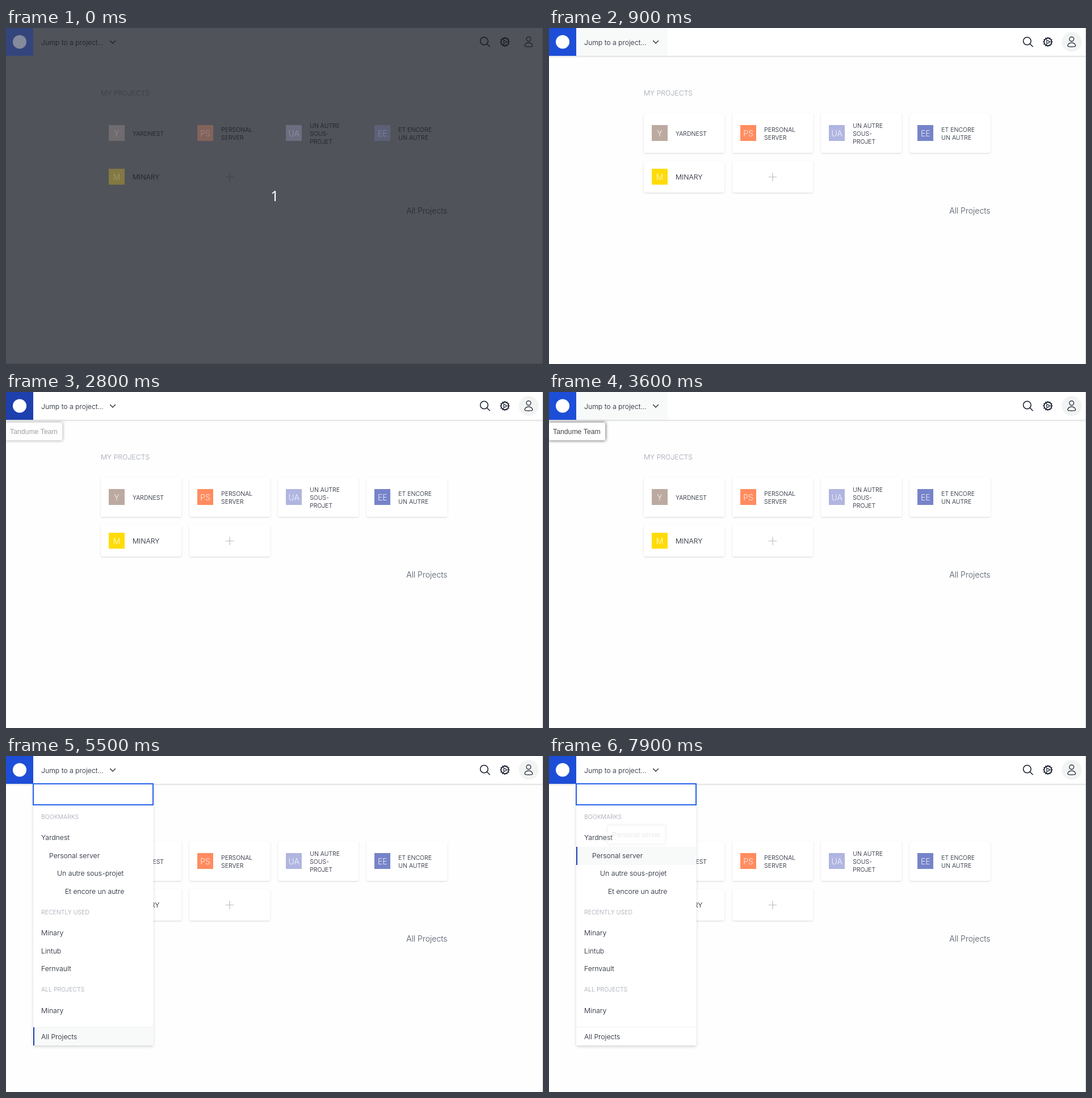
An HTML page with a canvas for the animation above (8 s loop, 946 by 592 pixels).

```html
<!DOCTYPE html>
<html lang="en">
<head>
<meta charset="utf-8">
<title>Project jump menu</title>
<style>
  html, body { margin: 0; width: 100%; height: 100%; overflow: hidden; background: #fff; }
  canvas { display: block; width: 946px; height: 592px; }
</style>
</head>
<body>
<canvas id="stage" width="946" height="592"></canvas>
<script>
const ctx = document.getElementById('stage').getContext('2d');
const W = 946, H = 592, LOOP = 8000, STEP = 100;
const INK = '#111827', MUTED = '#9ca3af', BLUE = '#1d4ed8', NAVY = '#1e40af';
const HOVER = '#f8faf9', VEIL = '#51535a';
const ROW = 31.5;

const cards = [
  { mark: 'Y', color: '#bcaaa0', lines: ['YARDNEST'] },
  { mark: 'PS', color: '#ff8c60', lines: ['PERSONAL', 'SERVER'] },
  { mark: 'UA', color: '#b0b5e1', lines: ['UN AUTRE', 'SOUS-', 'PROJET'] },
  { mark: 'EE', color: '#7783c9', lines: ['ET ENCORE', 'UN AUTRE'] },
  { mark: 'M', color: '#ffdb08', lines: ['MINARY'], size: 12.25 },
  { plus: true }
].map((card, i) => {
  const second = i > 3;
  return { ...card, x: 167 + (i % 4) * 156.1, y: second ? 234.5 : 150.5, h: second ? 56 : 70 };
});

const headings = [['BOOKMARKS', 107], ['RECENTLY USED', 275], ['ALL PROJECTS', 411.5]];
const items = [
  ['Yardnest', 144, 0], ['Personal server', 175.5, 1],
  ['Un autre sous-projet', 207, 2], ['Et encore un autre', 238.5, 3],
  ['Minary', 312, 0], ['Lintub', 343.5, 0], ['Fernvault', 375, 0],
  ['Minary', 448.5, 0], ['All Projects', 494.5, 0]
];

// [start time, value] pairs; the last one reached applies
const navHover = [[0, 0], [800, .5], [900, 1], [1300, .5], [1500, 0], [1800, 1], [2200, 0], [3600, 1], [4700, 0]];
const rowHover = [
  [0, -1], [5100, 2], [5200, 4], [5300, 6], [5400, 7], [5500, 8],
  [5800, 7], [5900, 6], [6000, 5], [6100, -1],
  [6300, 3], [6400, 2], [6600, 1], [6700, 0], [6900, -1], [7400, 0], [7500, 1]
];
const caret = [[0, 0], [4000, 1], [5200, 0], [6500, 1], [7700, 0]];

const at = (track, t) => track.filter(([start]) => start <= t).pop()[1];
const swing = x => .5 - Math.cos(Math.PI * Math.min(1, Math.max(0, x))) / 2;

function text(str, x, middle, size, color = INK, weight = 300, family = 'Inter', align = 'left') {
  ctx.font = `${weight} ${size}px ${family}, sans-serif`;
  ctx.textAlign = align;
  ctx.fillStyle = color;
  ctx.fillText(str, x, Math.round(middle + size * .36));
}

function rect(x, y, w, h, color) {
  ctx.fillStyle = color;
  ctx.fillRect(x, y, w, h);
}

// The shadow is clipped to the outside, so a translucent panel stays clean.
function panel(x, y, w, h, radius, blur, shadow, dy = 1) {
  const shape = new Path2D(), outside = new Path2D();
  shape.roundRect(x, y, w, h, radius);
  outside.rect(-50, -50, W + 100, H + 100);
  outside.addPath(shape);
  ctx.save();
  ctx.clip(outside, 'evenodd');
  ctx.shadowColor = shadow;
  ctx.shadowBlur = blur;
  ctx.shadowOffsetY = dy;
  ctx.fillStyle = '#fff';
  ctx.fill(shape);
  ctx.restore();
  ctx.fillStyle = '#fff';
  ctx.fill(shape);
}

function stroke(path, color = INK, width = 1.4) {
  ctx.strokeStyle = color;
  ctx.lineWidth = width;
  ctx.lineCap = ctx.lineJoin = 'round';
  ctx.stroke(new Path2D(path));
}

function disc(x, y, r, color) {
  ctx.fillStyle = color;
  ctx.beginPath();
  ctx.arc(x, y, r, 0, 2 * Math.PI);
  ctx.fill();
}

function ring(x, y, r, width = 1.4) {
  ctx.strokeStyle = INK;
  ctx.lineWidth = width;
  ctx.beginPath();
  ctx.arc(x, y, r, 0, 2 * Math.PI);
  ctx.stroke();
}

function drawGear(x, y) {
  ring(x, y, 6.6, 1.6);
  ring(x, y, 2.2, 1.1);
  for (let i = 0; i < 12; i++) {
    const a = i * Math.PI / 6, c = Math.cos(a), s = Math.sin(a);
    stroke(`M${x + 7 * c} ${y + 7 * s}L${x + 8 * c} ${y + 8 * s}`, INK, 1.5);
    if (i % 4 === 0) stroke(`M${x + 2.4 * c} ${y + 2.4 * s}L${x + 6.4 * c} ${y + 6.4 * s}`, INK, 1.2);
  }
}

function drawLogo(color, dot = '#fff') {
  rect(0, 0, 48, 49, color);
  disc(24, 24.5, 12, dot);
}

function drawHeader(hover, logoColor, dim) {
  if (!dim) panel(-5, -5, W + 10, 54, 0, 3, 'rgba(0,0,0,.2)');
  if (hover) {
    ctx.globalAlpha = hover;
    rect(48, 0, 161, 49, HOVER);
    ctx.globalAlpha = 1;
  }
  drawLogo(logoColor);
  text('Jump to a project...', 62, 25.5, 12.25);
  stroke('M183.5 22.5l4.5 4.5l4.5-4.5', INK, 1.1);
  ring(842.3, 23, 6.8, 1.5);
  stroke('M847.3 28l4.8 4.8', INK, 1.5);
  drawGear(878.8, 24.5);
  if (!dim) disc(920.7, 24.5, 17.5, '#f2f4f3');
  ring(920.7, 19.5, 3.9, 1.2);
  stroke('M913.8 31.5a6.9 5.6 0 0 1 13.8 0q0 1.6-6.9 1.6t-6.9-1.6z', INK, 1.2);
}

function drawMark({ mark, color, x, y, h }, alpha = 1) {
  const left = Math.round(x + 14), top = Math.round(y + h / 2 - 14.2);
  rect(left, top, 28, 28, VEIL);
  ctx.globalAlpha = alpha;
  rect(left, top, 28, 28, color);
  text(mark, x + 28, top + 14.5, 14, 'rgba(255,255,255,.85)', 300, 'Inter', 'center');
  ctx.globalAlpha = 1;
}

function drawCard(card, dim) {
  const { x, y, h, lines, size = 10.5 } = card;
  if (!dim) panel(x, y, 142.2, h - .5, 3.5, 3, 'rgba(0,0,0,.16)');
  const middle = y + h / 2 + .5;
  if (card.plus) {
    stroke('M387 262.5h14M394 255.5v14', '#b9bec6', 1.2);
    return;
  }
  drawMark(card);
  lines.forEach((line, i) => text(line, x + 56, middle + (i - (lines.length - 1) / 2) * 14, size));
}

function drawPage(hover, logoColor, dim) {
  rect(0, 0, W, H, '#fefefe');
  drawHeader(hover, logoColor, dim);
  text('MY PROJECTS', 167, 114.5, 12.25, MUTED);
  cards.forEach(card => drawCard(card, dim));
  text('All Projects', 777.5, 322, 14, '#4b5563', 300, 'Inter', 'right');
  rect(945, 0, 1, H, '#c4c6c8');
}

function drawMenu(active, caretOn) {
  panel(48, 49, 211.5, 461, [0, 0, 3, 3], 5, 'rgba(0,0,0,.18)', 2);
  rect(48, 477, 211.5, 1, '#f1f2f3');
  if (active >= 0) {
    const last = active === items.length - 1;
    const top = last ? 478 : Math.round(items[active][1] - ROW / 2 + .4);
    rect(48, top, 211.5, 32, HOVER);
    rect(48, top, 2, 32, NAVY);
  }
  headings.forEach(([label, y]) => text(label, 62, y, 10.5, MUTED));
  items.forEach(([label, y, depth]) => text(label, 62 + depth * 14, y, 12.25));
  rect(47, 48, 213, 39, '#2563eb');
  rect(49, 50, 209, 35, '#fff');
  if (caretOn) rect(59, 59, 1, 17, '#111');
}

function drawTooltip(label, x, y, w, alpha) {
  if (alpha <= 0) return;
  ctx.save();
  ctx.globalAlpha = alpha;
  panel(x, y, w, 33, 3, 5, '#666', 0);
  ctx.strokeStyle = '#bbb';
  ctx.lineWidth = 1;
  ctx.beginPath();
  ctx.roundRect(x + .5, y + .5, w - 1, 32, 3);
  ctx.stroke();
  text(label, x + 8, y + 16.5, 12.25, '#444', 400, '"Liberation Sans"');
  ctx.restore();
}

function drawCountdown() {
  drawPage(0, BLUE, true);
  rect(0, 0, W, H, 'rgba(26,29,38,.76)');
  drawLogo('#33457c', '#858a9c');
  cards.filter(card => card.mark).forEach(card => drawMark(card, .28));
  rect(0, 591, W, 1, '#45474d');
  text('1', 473.5, 296, 25, '#fff', 400, '"Noto Sans"', 'center');
}

function draw(t) {
  if (t < 100) return drawCountdown();
  drawPage(at(navHover, t), t >= 2200 && t < 3600 ? NAVY : BLUE, false);
  const fade = t < 3600 ? swing((t - 2600) / 400) : 1 - swing((t - 3600) / 400);
  drawTooltip('Tandume Team', -1, 53, 101, fade);
  if (t >= 4000) drawMenu(at(rowHover, t), at(caret, t));
  drawTooltip('Personal server', 103, 122, 102, swing((t - 7800) / 400) * .8);
}

function tick() {
  const t = performance.now() % LOOP;
  draw(Math.floor(t / STEP) * STEP);
  requestAnimationFrame(tick);
}
tick();
</script>
</body>
</html>
```
